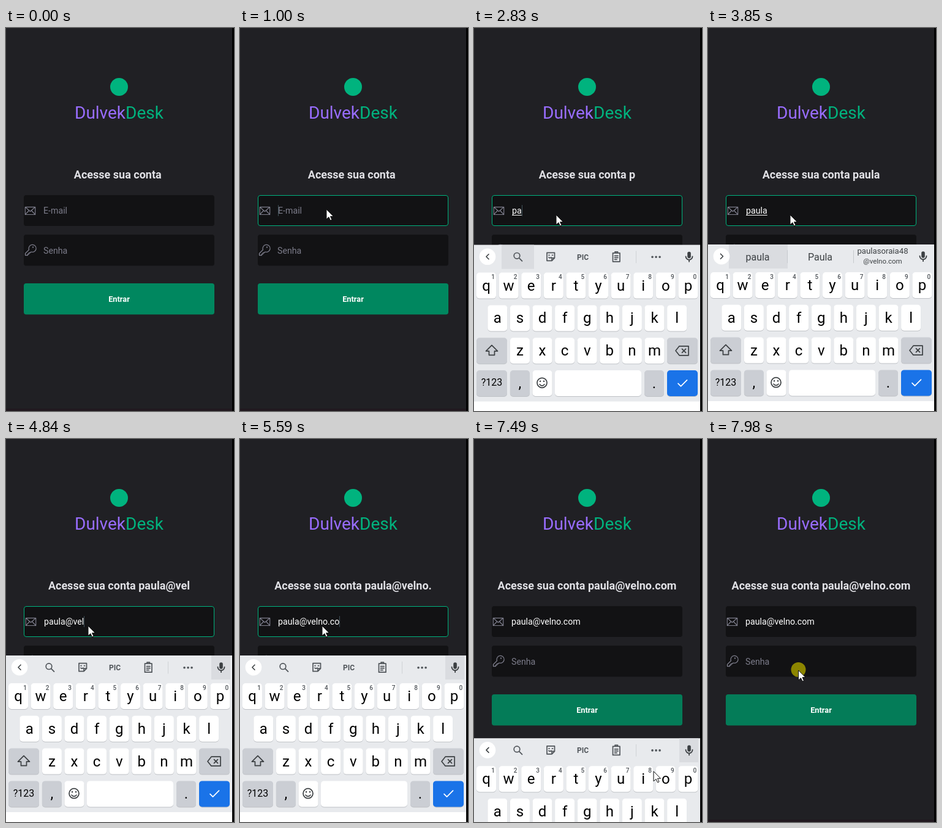
Recreate the animation shown at these times as an HTML page. Size 372 by 621 pixels, loop 8 s.

```html
<!DOCTYPE html>
<html lang="pt-BR">
<head>
<meta charset="utf-8">
<title>Login</title>
<style>
html, body { margin: 0; width: 100%; height: 100%; overflow: hidden; background: #000 }
svg { display: block; width: 372px; height: 621px; font-family: Roboto, "Noto Sans", sans-serif }
.mid { text-anchor: middle }
.bold { font-weight: 700 }
.entry { font-size: 14.2px }
.line { fill: none; stroke-linecap: round; stroke-linejoin: round }
</style>
</head>
<body>
<svg viewBox="0 0 372 621">
  <rect width="369" height="621" fill="#202024"/>
  <rect y="617" width="369" height="4" fill="#21191f"/>
  <circle cx="184.5" cy="95.5" r="14.5" fill="#00b37e"/>
  <text x="112" y="147" font-size="28" fill="#996dff">Dulvek<tspan fill="#00b37e">Desk</tspan></text>
  <text id="title" class="mid bold" x="184.5" y="244" font-size="18" fill="#e1e1e6"></text>

  <rect x="29" y="271" width="311" height="50" rx="4" fill="#121214"/>
  <rect id="border" x="29.5" y="271.5" width="310" height="49" rx="3.5" fill="none" stroke="#00b37e"/>
  <g id="email">
    <path class="line" d="M31.3 290.3H47.7V302.5H31.3ZL39.5 297.5 47.7 290.3M31.3 302.5L37.5 296M47.7 302.5L41.5 296" stroke="#7c7c8a" stroke-width="1.2"/>
    <text id="entry" class="entry" x="61" y="301"></text>
    <path id="underline" stroke="#fff"/>
    <path id="caret" stroke="#3f5058"/>
  </g>
  <rect x="29" y="335" width="311" height="50.5" rx="4" fill="#121214"/>
  <g class="line" stroke="#7c7c8a" stroke-width="1.3">
    <path d="M37.5 359.5A6 6 0 1 1 41 363L39.5 364.5H37.5V366.5H35.5V368.5H31.5V365.5Z"/>
    <circle cx="44" cy="355.5" r=".5"/>
  </g>
  <text class="entry" x="61" y="366" fill="#7c7c8a">Senha</text>
  <rect id="button" x="29" y="414" width="311" height="50.5" rx="4"/>
  <text class="mid bold" x="184.5" y="444" font-size="12.8" fill="#fff">Entrar</text>

  <g id="keyboard">
    <rect y="351" width="369" height="270" fill="#e8eaed"/>
    <rect y="605" width="369" height="16" fill="#fff"/>
    <rect id="glow" y="351" height="39" fill="#dadce0"/>
    <g transform="translate(0 -.8)">
      <circle cx="22" cy="371" r="13.3" fill="#fff"/>
      <path id="chevron" class="line" stroke="#3c4043" stroke-width="1.6"/>
      <g id="tools" class="line" stroke="#50555a" stroke-width="1.7">
        <circle cx="70" cy="369.5" r="4.8"/><path d="M74 373.5L78.5 378"/>
        <path d="M119 364.5H131.5V373L127 377.5H119ZM131 373H127V377M122 368.5H123M127.5 368.5H128.5M122 372q2 2 4 0"/>
        <path d="M226.5 365H238V379H226.5ZM230 365V363H234.5V365M229.5 369.5H235M229.5 372.5H235M229.5 375.5H233"/>
        <path d="M264.5 362V381" stroke="#d0d3d6" stroke-width="1"/>
        <path d="M291 371.5h.1M297 371.5h.1M303 371.5h.1" stroke-width="3.6"/>
        <text class="mid bold" x="177.5" y="376" font-size="12" fill="#50555a" stroke="none">PIC</text>
      </g>
      <g id="words" class="mid" fill="#3c4043">
        <path d="M129.5 361V382M237.5 361V382" stroke="#c6c9cd"/>
        <text id="plain" x="81" y="377.5" font-size="16"></text>
        <text id="capital" x="183" y="377.5" font-size="16"></text>
        <text x="285" y="366.5" font-size="13.2">paulasoraia48</text>
        <text x="285" y="382.5" font-size="11.5">@velno.com</text>
      </g>
      <rect x="348.2" y="363" width="5.6" height="10.5" rx="2.8" fill="#3c4043"/>
      <path class="line" d="M345.5 370.5a5.5 5.5 0 0 0 11 0M351 376V379" stroke="#3c4043" stroke-width="1.8"/>
    </g>
    <g id="keys"></g>
    <g class="line" stroke="#3c4043" stroke-width="1.7" transform="translate(0 -.8)">
      <path d="M29 514.5L38.5 524H33.5V530.5H24.5V524H19.5Z"/>
      <path d="M335 516H350V531H335L329 523.5ZM339.5 520.5L345.5 526.5M345.5 520.5L339.5 526.5"/>
      <circle cx="111" cy="575.5" r="8"/>
      <path d="M107 578q4 4.5 8 0"/><path d="M108 573h.1M114 573h.1" stroke-width="2.4"/>
      <path d="M333 576.5L337.5 581 347.5 571" stroke="#fff"/>
    </g>
  </g>

  <g id="pointer">
    <circle id="click" r="12" cy="-1" fill="#8c8500"/>
    <path d="M0 0V16L4 12.5 6.5 18 9 17 6.5 11.5H11.5Z" fill="#fff" stroke="#111"/>
  </g>
</svg>
<script>
const el = Object.fromEntries([...document.querySelectorAll('[id]')].map(n => [n.id, n]));
const address = 'paula@velno.com';
const FOCUS = 910, OPEN = 2690, CLOSE = 7350;
const typedAt = [2420, 2760, 2990, 3170, 3350, 4310, 4450, 4590, 4730, 4870, 5010, 5200, 5420, 5540, 5680];
const titleAt = [2690, 2900, 3110, 3280, 3440, 4380, 4520, 4680, 4820, 4960, 5110, 5300, 5620, 5740, 5850];
const clicks = [[860, 1000], [7070, 7210], [7910, 8000]];
// time, x, y
const route = [[310, 329, 571], [860, 141, 294], [1000, 141, 294], [1210, 134, 303], [6510, 134, 303],
  [6650, 190, 211], [7000, 338.5, 585], [7070, 342, 594], [7350, 342, 594], [7910, 147.5, 375]];

// Keyboard keys
let keys = '';
function key(x, row, width, label = '', fill = '#fff', size = 24) {
  const y = 396 + row * 52.8;
  keys += `<rect x="${x}" y="${y + 1}" width="${width}" height="42" rx="5" fill="#bfc2c6"/>
    <rect x="${x}" y="${y}" width="${width}" height="42" rx="5" fill="${fill}"/>
    <text class="mid" x="${x + width / 2}" y="${y + (size < 20 ? 25.5 : 29)}" font-size="${size}" fill="#000">${label}</text>`;
}
const gray = '#cbced4', pitch = 36.6;
[['qwertyuiop', 4], ['asdfghjkl', 22.3], ['zxcvbnm', 58.9]].forEach(([letters, x], row) =>
  [...letters].forEach((c, i) => key(x + i * pitch, row, 32, c)));
[...'1234567890'].forEach((d, i) =>
  keys += `<text class="mid" x="${31 + i * pitch}" y="406.5" font-size="10" font-weight="500" fill="#50555a">${d}</text>`);
key(4, 2, 50, '', gray);
key(315, 2, 50, '', gray);
key(4, 3, 50, '?123', gray, 16);
key(58.9, 3, 32, ',', gray);
key(95.5, 3, 32);
key(132, 3, 141);
key(278, 3, 32, '.', gray);
key(315, 3, 50, '', '#1a73e8');
el.keys.innerHTML = keys;

const show = (node, on) => node.setAttribute('visibility', on ? 'visible' : 'hidden');
const set = (node, attrs) => { for (const k in attrs) node.setAttribute(k, attrs[k]); };
const count = (times, t) => times.filter(x => x <= t).length;

function pointerAt(t) {
  const i = route.findIndex(p => p[0] > t);
  if (i < 0) return route.at(-1).slice(1);
  if (i === 0) return route[0].slice(1);
  const [a, b] = [route[i - 1], route[i]];
  const p = (t - a[0]) / (b[0] - a[0]);
  return [1, 2].map(k => a[k] + (b[k] - a[k]) * p);
}

function keyboardOffset(t) {
  if (t < CLOSE) return 270 * (1 - Math.min(1, (t - OPEN) / 180)) ** 4;
  return 270 * Math.min(1, (t - CLOSE) / 200) ** 2;
}

function draw(t) {
  const n = count(typedAt, t), text = address.slice(0, n);
  const focused = t >= FOCUS && t < CLOSE;
  el.title.textContent = 'Acesse sua conta\u00a0' + address.slice(0, count(titleAt, t));
  el.entry.textContent = text || 'E-mail';
  set(el.entry, { fill: n ? '#fff' : '#7c7c8a' });
  set(el.email, { transform: `translate(${focused ? 1 : 0})` });
  show(el.border, focused);

  const end = 61 + (n ? el.entry.getComputedTextLength() : 0);
  const since = t - (n ? typedAt[n - 1] : FOCUS);
  set(el.caret, { d: `M${Math.round(end) + .5} 287V305` });
  show(el.caret, focused && Math.floor(since / 500) % 2 === 0);
  set(el.underline, { d: `M61 303.5H${end}` });
  show(el.underline, n > 1 && n < 6);
  set(el.button, { fill: t < CLOSE ? '#00875f' : '#047c58' });

  const open = t >= OPEN && t < CLOSE + 200;
  const suggest = t >= 2960 && t < 4450;
  el.keyboard.style.display = open ? '' : 'none';
  set(el.keyboard, { transform: `translate(0 ${open ? keyboardOffset(t) : 0})` });
  el.tools.style.display = suggest ? 'none' : '';
  el.words.style.display = suggest ? '' : 'none';
  el.plain.textContent = text;
  el.capital.textContent = text.charAt(0).toUpperCase() + text.slice(1);
  const [x, width] = suggest ? [34, 96] : t < 4450 ? [45, 53] : [335, 31];
  set(el.glow, { x, width });
  set(el.chevron, { d: suggest ? 'M20.5 367L24.5 371 20.5 375' : 'M24 367L20 371 24 375' });

  set(el.pointer, { transform: `translate(${pointerAt(t)})` });
  el.pointer.style.display = t < route[0][0] ? 'none' : '';
  show(el.click, clicks.some(([a, b]) => t >= a && t < b));
}

const start = performance.now();
function tick() {
  draw((performance.now() - start) % 8000);
  requestAnimationFrame(tick);
}
tick();
</script>
</body>
</html>
```
